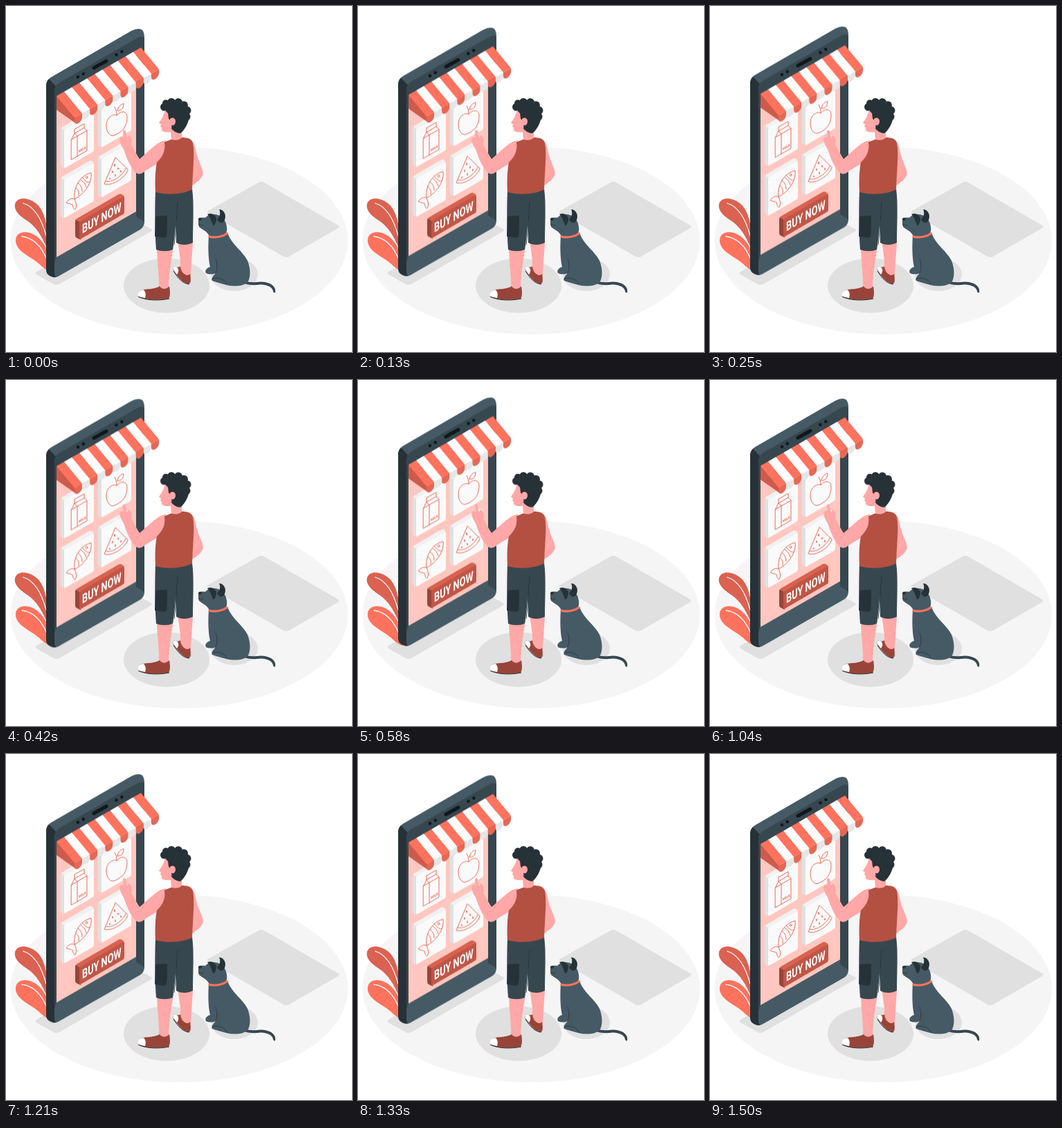
Recreate the animation shown at these times as an HTML page. Size 500 by 500 pixels, loop 1.54 s.

```html
<!DOCTYPE html>
<html lang="en">
<head>
<meta charset="utf-8">
<title>Online grocery shopping</title>
<style>
  html, body { margin: 0; width: 100%; height: 100%; overflow: hidden; background: #fff; }
  svg { display: block; width: 100%; height: 100%; }
  .phone { animation: float 1540ms linear infinite; }
  /* up and down in 1500 ms, then a 40 ms rest */
  @keyframes float {
    0%, 97.4%, 100% { transform: translateY(0); }
    48.7% { transform: translateY(-10px); }
  }
  .shade { fill: #e0e0e0; }
  .skin { fill: #ffa8a7; }
  .slate { fill: #37474f; }
  .steel { fill: #455a64; }
  .dark { fill: #263238; }
  .rust { fill: #b35042; }
  .icon { fill: none; stroke: #f06a57; stroke-width: 1; stroke-linejoin: round; stroke-linecap: round; }
  text { font-family: Roboto, Arial, sans-serif; font-weight: 700; }
</style>
</head>
<body>
<svg viewBox="0 0 500 500">
  <defs>
    <g id="card">
      <path fill="#e0e0e0" d="M78.500 178Q78.500 175 81 175.500L85 179V235L81 233Q78.500 232 78.500 229Z"/>
      <path fill="#f1f1f1" d="M80 175.500L120 152Q122 151 124 152L127 154L84 180Z"/>
      <path fill="#fafafa" d="M84 182Q84 179 86 178L124 156Q127 154 127 157V207Q127 210 125 211L87 233Q84 235 84 232Z"/>
    </g>
  </defs>

  <!-- floor -->
  <ellipse cx="250.300" cy="339" rx="243.700" ry="135.500" fill="#f5f5f5"/>
  <g class="shade">
    <path d="M365 255Q369 253 373 255L480 317Q483 319 480 321L409 362Q405 364 401 362L292 299Q289 298 292 296Z"/>
    <path d="M44 384L180 306L209 322Q213 324 209 326L77 402Q73 404 69 402L44 388Q41 386 44 384Z"/>
    <ellipse cx="232" cy="404" rx="62" ry="39.500"/>
    <ellipse cx="330" cy="388" rx="34" ry="24"/>
  </g>

  <!-- leaves -->
  <path fill="#db6251" d="M60 352C52 333 44 319 30 310C19 303 11 295 13 286C17 275 32 277 43 285C55 294 59 314 61 335Z"/>
  <path fill="#ff725e" d="M64 384C56 381 50 374 42 368C30 360 16 353 14 341C13 331 20 326 30 327C46 329 57 344 61 358Z"/>
  <g fill="none" stroke="#fff" stroke-width="1.300" stroke-linecap="round">
    <path d="M25 285C41 290 51 306 58 332M23 333C40 335 51 347 59 366"/>
  </g>

  <g class="phone">
    <path class="steel" d="M58 116Q58 107 65 103L181 36Q190 31 196 34Q200 37 200 45V312Q200 319 194 323L75 391Q68 394 62 389Q58 386 58 381Z"/>
    <path class="dark" d="M58 116Q58 109 62 105.500L72 116Q70 119 70 124V385Q70 391 73 391.500Q67 393 62 389Q58 386 58 381Z"/>
    <path class="slate" d="M70 124Q70 115 77 111L190 46Q200 41 200 50V312L188 304V100L73 160V362L70 372Z"/>
    <path fill="#ffc7bf" d="M73 132L188 66V297L73 363Z"/>
    <path stroke="#10181c" stroke-width="5" stroke-linecap="round" d="M127 89.500L145 79.500"/>
    <g fill="#10181c">
      <circle cx="104" cy="102.500" r="2.300"/><circle cx="111.800" cy="98" r="2.300"/>
      <circle cx="159.500" cy="70.500" r="2.300"/><circle cx="167.300" cy="66" r="2.300"/>
    </g>

    <use href="#card"/>
    <use href="#card" x="54" y="-30"/>
    <use href="#card" y="72"/>
    <use href="#card" x="54" y="42"/>

    <g class="icon">
      <!-- milk -->
      <path d="M94.500 193L117 180V209L94.500 222ZM103 188.500V217.500M94.500 193L99 184L103 188.500M99 184L113 176L117 180M99 184V178L113 170V176"/>
      <!-- apple -->
      <path d="M160 158C153 155 145 162 145 173C145 183 151 189 156 187C160 186 162 184 165 182C171 179 175 170 175 161C175 152 167 150 160 158C160 153 159 149 157 146M161 151C162 145 166 142 170 141C170 147 167 152 161 151"/>
      <!-- fish -->
      <path d="M99 279C97 263 106 245 123 241C125 254 114 272 99 279C95 277 91 279 87 284C91 286 94 286 96 287C97 291 98 295 100 294C103 289 101 283 99 279M110 247C113 252 117 255 121 255M104 256C107 258 110 261 110 268M108 251C112 254 115 257 116 262M101 263C104 265 106 268 105 274"/>
      <circle cx="116.500" cy="247.500" r="1.500"/>
      <!-- melon -->
      <path d="M158 219L142 257C152 261 172 249 176 237ZM144 253C153 256 168 246 173.500 234"/>
      <path stroke-width="1.700" d="M157 229V231M154 239V240.500M162 234V235.500M150 249V250M158 244V245.500M166 238V239.500"/>
    </g>
    <text transform="matrix(.95 -.55 0 1 105 212)" font-size="5" fill="#f06a57">MILK</text>

    <!-- button -->
    <path fill="#994438" d="M100 311Q100 308 102 309L108 312V338L102 335Q100 334 100 331Z"/>
    <path fill="#d9614f" d="M101 308L163 272Q165 271 167 272L171 275L107 313Z"/>
    <path fill="#bf5647" d="M106 315Q106 312 108 311L168 276Q171 274 171 277V297Q171 300 169 301L109 336Q106 338 106 335Z"/>
    <text transform="matrix(.69 -.398 0 1 110 329)" font-size="18.500" fill="#fff">BUY NOW</text>

    <!-- awning -->
    <path fill="#cc5b4b" d="M73 130V150L100 169V161Z"/>
    <g id="awning"></g>
  </g>

  <!-- man -->
  <path class="skin" d="M218 345H242C241 360 236 375 235 410C231 414 224 413 221 408C222 390 218 370 218 345ZM248 335H270C270 352 268 365 267 390C262 395 254 392 252 380C253 365 249 352 248 335Z"/>
  <path class="skin" d="M260 190C270 191 273 200 275 212C278 225 285 235 285 243C283 249 276 255 268 260L264 240Z"/>
  <path fill="#994438" d="M222 405C216 409 205 409 196 410C190 413 190 419 193 421C203 425 221 426 235 423C238 419 237 411 236 405C231 410 226 410 222 405ZM252 376C249 379 246 376 243 376C240 379 242 384 246 388C252 396 258 401 264 402C268 401 267 393 266 387C262 392 253 387 252 376Z"/>
  <path fill="#fff" d="M198 410C191 411 189 417 192 420L201 422C203 416 201 411 198 410ZM247 377C242 375 240 378 243 383L247 388C250 384 250 380 247 377Z"/>
  <path fill="none" stroke="#263238" d="M191 420C203 426 222 426 236 423M242 383C248 393 256 402 265 402"/>
  <path class="slate" d="M244 268L269 264C272 285 270 318 270 342C263 346 252 346 246 342Z"/>
  <path class="slate" d="M216 265L260 268L247 295C245 315 244 335 241 352C234 355 224 355 217 352C215 325 215 295 216 265Z"/>
  <path class="dark" d="M216 304L233 303C233 314 233 324 232 333L229 335L215 333Z"/>
  <path fill="none" stroke="#263238" stroke-width=".8" d="M248 283C246 305 246 325 243 345"/>
  <path class="skin" d="M231 194C220 196 214 203 208 208C202 213 197 218 193 221C189 215 185 207 181 201C182 197 182 192 179 188C177 186 176 188 176 191L174 189L173 181C172 179 169 179 169 182L170 190C167 188 164 190 164 193C165 198 167 203 170 207C175 222 180 234 188 241C193 245 198 241 203 237L220 227L234 208Z"/>
  <path class="rust" d="M229 197C235 194 244 190 254 190C262 190 268 192 270 198C273 212 270 235 269 265C255 273 230 273 216 269C215 250 216 236 218 226C226 218 231 210 229 197Z"/>
  <path class="skin" d="M230 150C228 159 224 164 221 169L224 171L223 174L225 176C224 181 227 183 238 182L239 193C245 195 252 193 254 190L255 175L250 150Z"/>
  <path class="dark" d="M231 152C229 147 234 138 245 138C258 138 265 146 265 160C263 172 257 180 252 184C247 184 242 181 239 177C241 172 236 168 237 165C234 163 235 159 234 155Z"/>
  <g class="dark">
    <circle cx="228.500" cy="146" r="5.500"/><circle cx="231" cy="140.500" r="5"/>
    <circle cx="239" cy="138.500" r="5.500"/><circle cx="249" cy="139" r="5.800"/>
    <circle cx="257" cy="143.500" r="6"/><circle cx="261.500" cy="151" r="6"/>
    <circle cx="261" cy="160" r="5.500"/>
  </g>
  <ellipse class="skin" cx="240.500" cy="167" rx="4.500" ry="5.500"/>

  <!-- dog -->
  <path fill="none" stroke="#37474f" stroke-width="4" stroke-linecap="round" d="M344 399C357 404 364 399 374 401"/>
  <path class="slate" d="M373 399C384 400 391 407 389 414C388 415 386 414 386 412C385 407 380 404 373 403Z"/>
  <path class="steel" d="M293 332C292 345 292 365 295 377C289 379 287 383 289 386C293 388 299 388 303 386C299 390 296 395 298 397C303 399 311 401 318 403C330 406 345 405 350 398C354 390 353 378 349 368C343 355 326 345 320 328Z"/>
  <path fill="none" stroke="#263238" stroke-width=".7" d="M303 386C306 379 305 372 303 365M298 394C306 392 316 394 319 402"/>
  <path class="steel" d="M278 310C277 306 281 305 288 306C292 302 296 300 300 301C311 301 318 309 319 319C320 328 318 331 308 333C300 335 293 334 293 331C290 325 283 323 279 319L278 316Z"/>
  <path fill="none" stroke="#263238" stroke-width=".8" d="M278.500 316L285 317"/>
  <path class="dark" d="M291 301C297 298 304 302 304 309C303 314 301 318 299 317C297 311 295 305 291 301ZM305 308C310 304 310 298 308 294C315 294 319 302 316 309C313 316 307 313 305 308Z"/>
  <ellipse class="dark" cx="280.500" cy="308" rx="2.500" ry="2"/>
  <path fill="none" stroke="#ff725e" stroke-width="3.200" d="M292.500 333C303 336 314 333 320.500 328"/>
</svg>
<script>
  const awning = document.getElementById('awning');
  const stripes = 11, dx = 122 / stripes, dy = -70 / stripes;

  function addPath(d, fill) {
    const path = document.createElementNS('http://www.w3.org/2000/svg', 'path');
    path.setAttribute('d', d);
    path.setAttribute('fill', fill);
    awning.append(path);
  }

  for (let i = 0; i < stripes; i++) {
    const coral = i % 2 === 0;
    const x = 73 + i * dx, y = 130 + i * dy;
    const left = x + 26, low = y + 31.5;
    const right = left + dx, high = low + dy;
    addPath(`M${left} ${low}V${low + 5}C${left} ${low + 13} ${right} ${high + 13} ${right} ${high + 5}V${high}Z`,
      coral ? '#e66755' : '#e6e6e6');
    addPath(`M${x} ${y}L${x + dx} ${y + dy}L${right} ${high}L${left} ${low}Z`,
      coral ? '#ff725e' : '#fff');
  }
</script>
</body>
</html>
```
